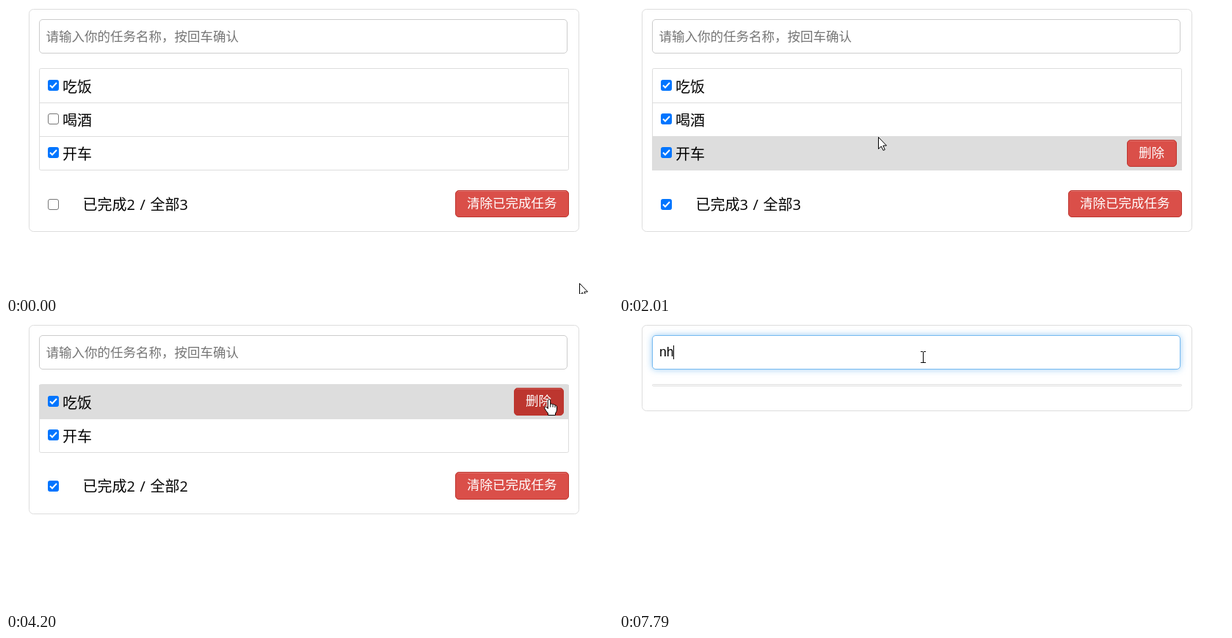
Recreate the animation shown at these times as an HTML page with a canvas. Size 827 by 394 pixels, loop 8 s.

```html
<!DOCTYPE html>
<html lang="zh-CN">
<head>
<meta charset="utf-8">
<title>任务清单</title>
<style>
html, body { margin: 0; width: 100%; height: 100%; overflow: hidden; background: #fff; }
canvas { display: block; }
</style>
</head>
<body>
<canvas id="stage" width="827" height="394"></canvas>
<script>
const ctx = document.getElementById('stage').getContext('2d');
const LOOP = 8000;
const UI = '"Open Sans", "Noto Sans CJK SC", "Noto Sans CJK", sans-serif';
const LATIN = '"Liberation Sans", sans-serif';
const ROW = 46.25;
const LIST_TOP = 86;
const BUTTON_H = 37.5;

// When things happen, in ms
const T = {
  check: 1610,
  ask1: 2640, del1: 3180,
  ask2: 4370, del2: 5210,
  clear: 5760, focus: 6600, blink: 7080,
  type: 7630, keyGap: 160
};

// Pointer moves: each eases from the previous spot; bow bends it up or down
const origin = { x: 781, y: 379 };
const moves = [
  { from: 0, to: 590, x: 385, y: 140, bow: -105 },
  { from: 720, to: 1365, x: 95, y: 140, bow: 6 },
  { from: T.check + 40, to: 2480, x: 710, y: 146, bow: 38 },
  { from: T.ask1, to: 3030, x: 545, y: 76 },
  { from: T.del1, to: 4180, x: 740, y: 105, bow: -35 },
  { from: T.ask2, to: 5130, x: 525, y: 74 },
  { from: T.del2 + 80, to: 5700, x: 684, y: 178 },
  { from: T.clear + 20, to: 6135, x: 485, y: 119 },
  { from: 6215, to: T.focus, x: 417, y: 55 },
  { from: 6880, to: 6920, x: 414, y: 48 }
];

const clamp = v => Math.min(1, Math.max(0, v));
const ease = k => (k + k * k * (3 - 2 * k)) / 2;

function pointerAt(t) {
  const p = { ...origin };
  for (const m of moves) {
    if (t < m.from) break;
    const k = ease(clamp((t - m.from) / (m.to - m.from)));
    p.x += (m.x - p.x) * k;
    p.y += (m.y - p.y) * k + (m.bow || 0) * Math.sin(Math.PI * k);
  }
  return { x: Math.round(p.x), y: Math.round(p.y) };
}

const inside = (p, x, y, w, h) => p.x >= x && p.x < x + w && p.y >= y && p.y < y + h;

function box(x, y, w, h, r, fill, stroke) {
  ctx.beginPath();
  ctx.roundRect(x + .5, y + .5, w - 1, h - 1, r);
  if (fill) { ctx.fillStyle = fill; ctx.fill(); }
  if (stroke) { ctx.strokeStyle = stroke; ctx.lineWidth = 1; ctx.stroke(); }
}

function rect(x, y, w, h, color) {
  ctx.fillStyle = color;
  ctx.fillRect(x, y, w, h);
}

// Text placed by its left edge and the middle of its line
function text(s, x, mid, size, color = '#000', family = UI) {
  ctx.font = `${size}px ${family}`;
  ctx.fillStyle = color;
  ctx.fillText(s, x, mid + size * .375);
}

function checkbox(x, y, on, hot) {
  if (!on) {
    box(x, y, 15, 15, 2.5, '#fff', hot ? '#4f4f4f' : '#767676');
    return;
  }
  const blue = hot ? '#005cc8' : '#0075ff';
  box(x, y, 15, 15, 2, blue, blue);
  ctx.beginPath();
  ctx.moveTo(x + 3, y + 7.5);
  ctx.lineTo(x + 6, y + 10.5);
  ctx.lineTo(x + 12, y + 4);
  ctx.strokeStyle = '#fff';
  ctx.lineWidth = 2;
  ctx.stroke();
}

// Draws a red button and tells whether the pointer is on it
function redButton(label, x, y, w, p) {
  const top = Math.round(y), h = Math.round(y + BUTTON_H) - top;
  const hot = inside(p, x, top, w, h);
  box(x, top + 1, w, h, 4.5, 'rgba(0,0,0,.04)');
  box(x, top, w, h, 4.5, hot ? '#bd362f' : '#da4f49', '#bd362f');
  rect(x + 4, top + 1, w - 8, 1, 'rgba(255,255,255,.2)');
  text(label, x + 16, top + 17.5, 17.5, '#fff');
  return hot;
}

function input(t) {
  const focused = t >= T.focus;
  ctx.save();
  if (focused) {
    ctx.shadowColor = 'rgba(82,168,236,.65)';
    ctx.shadowBlur = 10;
  }
  box(45, 18, 720, 47, 4.5, '#fff');
  ctx.restore();
  box(45, 18, 720, 47, 4.5, null, focused ? '#75b9f0' : '#ccc');

  const keys = Math.max(0, Math.floor((t - T.type) / T.keyGap) + 1);
  const typed = 'nh'.slice(0, keys);
  if (typed) text(typed, 55, 40.5, 17.5, '#000', LATIN);
  else text('请输入你的任务名称，按回车确认', 54.5, 41, 17.5, '#757575');
  if (focused && (t < T.blink || typed)) rect(55 + Math.round(typed.length * 9.6), 32, 1, 19, '#000');
}

function list(items, p) {
  const bottom = Math.round(86.5 + items.length * 45.9);
  box(45, 85, 722, bottom - 84, 2, null, '#ddd');
  let hand = false;
  items.forEach((item, i) => {
    const top = LIST_TOP + i * 46;
    const hot = inside(p, 45, top, 722, 46);
    const onLabel = hot && p.x >= 55 && p.x < 118;
    if (i) rect(45, top, 722, 1, '#ddd');
    if (hot) {
      rect(45, top, 722, 47, '#ddd');
      hand = redButton('删除', 692, 90.4 + i * ROW, 68, p) || onLabel;
    }
    checkbox(57, top + 15, item.done, onLabel);
    text(item.name, 77, top + 24, 20);
  });
  return hand;
}

function footer(items, p) {
  const n = items.length;
  const done = items.filter(i => i.done).length;
  const y = 112.95 + n * ROW;
  const top = Math.round(y);
  checkbox(57, top + 12, done === n);
  text('已完成' + done, 104.5, top + 19, 20);
  text('/', 182.5, top + 19, 20);
  text('全部' + n, 196.5, top + 19, 20);
  return redButton('清除已完成任务', 612, y, 155, p);
}

function dialog() {
  ctx.save();
  ctx.shadowColor = 'rgba(0,0,0,.3)';
  ctx.shadowBlur = 6;
  box(126, -40, 560, 160, 5, '#fff');
  ctx.restore();
  text('确定删除吗？', 146, 26, 16, '#3c4043');
  box(486, 60, 85, 40, 5, '#1a73e8');
  text('确定', 512, 80, 16, '#fff');
  box(581, 60, 85, 40, 5, '#fff', '#dadce0');
  text('取消', 607, 80, 16, '#1a73e8');
}

const shapes = {
  arrow: new Path2D('M.5 .5V16.5L4.3 13L7 18.5L9.3 17.5L6.8 12H11.5Z'),
  hand: new Path2D('M-1.7 2Q0-1 1.7 2V7.5Q3.5 6 5 8Q7 7 8 9Q10.3 8.6 10.5 11V15Q10.3 17.5 8.5 20V22.5H-1.5V20' +
    'Q-4.5 16.5-6.3 13Q-6.4 10-3.8 11.3L-1.7 13.5Z'),
  knuckles: new Path2D('M1.7 7.5V11.5M5 8.5V11.5M8 9.5V12')
};

function pointer(kind, p) {
  ctx.save();
  ctx.translate(p.x, p.y);
  if (kind === 'beam') {
    rect(0, -7, 1, 15, '#000');
    for (const y of [-8, 7]) {
      rect(-3, y, 3, 1, '#000');
      rect(1, y, 3, 1, '#000');
    }
  } else {
    ctx.fillStyle = '#fff';
    ctx.strokeStyle = '#000';
    ctx.lineWidth = 1;
    ctx.fill(shapes[kind]);
    ctx.stroke(shapes[kind]);
    if (kind === 'hand') ctx.stroke(shapes.knuckles);
  }
  ctx.restore();
}

function itemsAt(t) {
  return [
    { name: '吃饭', done: true, end: T.del2 },
    { name: '喝酒', done: t >= T.check, end: T.del1 },
    { name: '开车', done: true, end: T.clear }
  ].filter(item => t < item.end);
}

function draw(t) {
  const items = itemsAt(t);
  const n = items.length;
  const p = pointerAt(t);
  const asked = t >= T.ask1 && t < T.del1 ? T.ask1 : t >= T.ask2 && t < T.del2 ? T.ask2 : 0;
  // Hover stays as it was while the dialog is open
  const hover = asked ? pointerAt(asked) : p;

  rect(0, 0, 827, 394, '#fff');
  const bottom = n ? Math.round(170.2 + n * ROW) : 122;
  box(31, 4, 750, bottom - 4, 6, '#fff', '#ddd');
  input(t);
  let hand = list(items, hover);
  if (n) hand = footer(items, hover) || hand;
  if (asked) dialog();

  const overInput = inside(p, 45, 18, 720, 47);
  pointer(asked ? 'arrow' : overInput ? 'beam' : hand ? 'hand' : 'arrow', p);
}

const start = performance.now();
function tick() {
  draw((performance.now() - start) % LOOP);
  requestAnimationFrame(tick);
}
tick();
</script>
</body>
</html>
```
